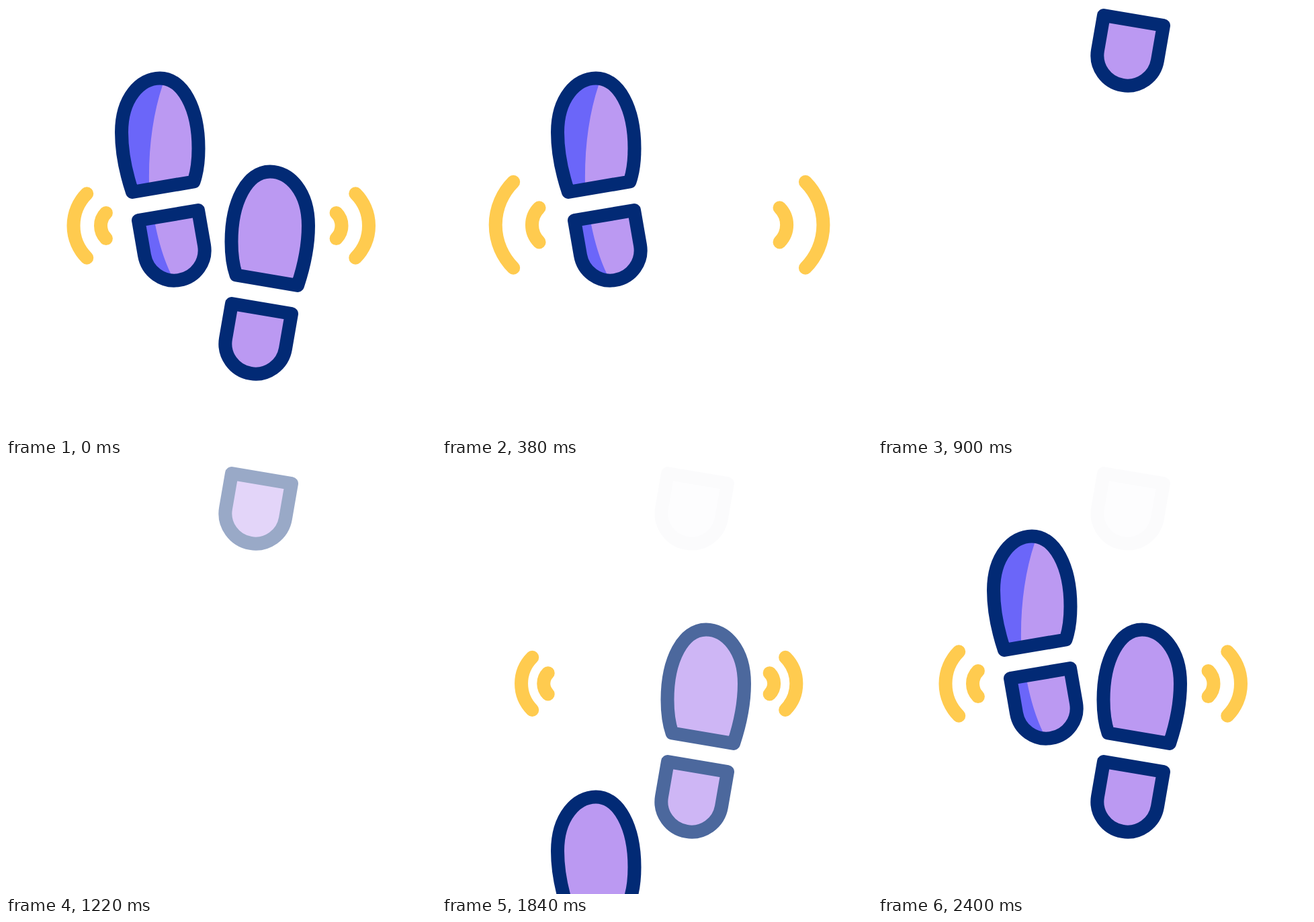
Recreate the animation shown at these times as an HTML page. Size 640x640 px, loop 2600 ms.

```html
<!DOCTYPE html>
<html lang="en">
<head>
<meta charset="utf-8">
<title>Footsteps</title>
<style>
  html, body { margin: 0; height: 100%; overflow: hidden; background: #fff; }
  svg { display: block; width: 100%; height: 100%; }
  .outline { fill: none; stroke: #022a75; stroke-width: 20; stroke-linejoin: round; }
  .sole { fill: #bb99f2; }
  .shade { fill: #6b66f9; }
  #waves { fill: none; stroke: #ffcb4f; stroke-width: 20; stroke-linecap: round; }
</style>
</head>
<body>
<svg viewBox="0 0 640 640">
  <defs>
    <path id="shape" d="M188 277C178 247 172 216 172 188C172 137 200 107.5 229 107.5C263 107.5 286.5 152 286.5 212C286.5 232 284.5 247 279.5 261.5Z
      M197 319L286 304L295 356A45 45 0 0 1 206 371Z"/>
    <clipPath id="inside"><use href="#shape"/></clipPath>
    <g id="foot">
      <use href="#shape" class="sole"/>
      <use href="#shape" class="outline"/>
    </g>
  </defs>
  <g id="left">
    <use href="#shape" class="sole"/>
    <path class="shade" clip-path="url(#inside)" d="M150 100H239L233 118C219 160 212 210 213 264V290H150Z
      M180 300H217L222 325C227 350 235 378 246 400V420H180Z"/>
    <use href="#shape" class="outline"/>
  </g>
  <use id="right" href="#foot" transform="translate(622 139) scale(-1 1)"/>
  <use id="ahead" href="#foot" transform="translate(622 -290) scale(-1 1)"/>
  <use id="behind" href="#foot" transform="translate(0 388)"/>
  <path id="waves"/>
</svg>
<script>
const LOOP = 2600, FADE = 200, WAVE_FADE = 267, WAVE_TIME = 567;
const OUTER = 67.5, INNER = 27;

// Wave group poses: scale, centre x of each side, shared centre y
const SMALL = { scale: 0.485, left: 183.4, right: 471.1, y: 326.5 };
const REST = { scale: 1, left: 168, right: 472.5, y: 327 };
const WIDE = { scale: 1.69, left: 172.4, right: 481.5, y: 324.6 };

const byId = id => document.getElementById(id);
const ramp = (t, start, length = FADE) => Math.min(1, Math.max(0, (t - start) / length));
const smooth = p => p * p * (3 - 2 * p);
const setOpacity = (id, value) => byId(id).setAttribute('opacity', value);

// Quarter-circle arc opening towards its centre; side is -1 (left) or 1 (right)
function arc(cx, cy, radius, side) {
  const d = radius * Math.SQRT1_2, x = cx + side * d;
  return `M${x} ${cy - d}A${radius} ${radius} 0 0 ${side > 0 ? 1 : 0} ${x} ${cy + d}`;
}

function wavePath(from, to, p) {
  const mix = key => from[key] + (to[key] - from[key]) * p;
  const scale = mix('scale'), y = mix('y');
  return [OUTER, INNER].map(r =>
    arc(mix('left'), y, r * scale, -1) + arc(mix('right'), y, r * scale, 1)).join('');
}

function draw(t) {
  setOpacity('right', 1 - ramp(t, 100) + ramp(t, 1700));
  setOpacity('left', 1 - ramp(t, 700) + ramp(t, 2200));
  setOpacity('behind', ramp(t, 1500) - ramp(t, 2000));
  // A faint trace of the leading step stays until the loop restarts
  setOpacity('ahead', ramp(t, 500) - 0.99 * ramp(t, 1100));

  setOpacity('waves', 1 - ramp(t, 500, WAVE_FADE) + ramp(t, 1500, WAVE_FADE));
  byId('waves').setAttribute('d', t < 1200
    ? wavePath(REST, WIDE, smooth(ramp(t, 100, WAVE_TIME)))
    : wavePath(SMALL, REST, smooth(ramp(t, 1500, WAVE_TIME))));
}

const startTime = performance.now();
function tick() {
  draw((performance.now() - startTime) % LOOP);
  requestAnimationFrame(tick);
}
tick();
</script>
</body>
</html>
```
